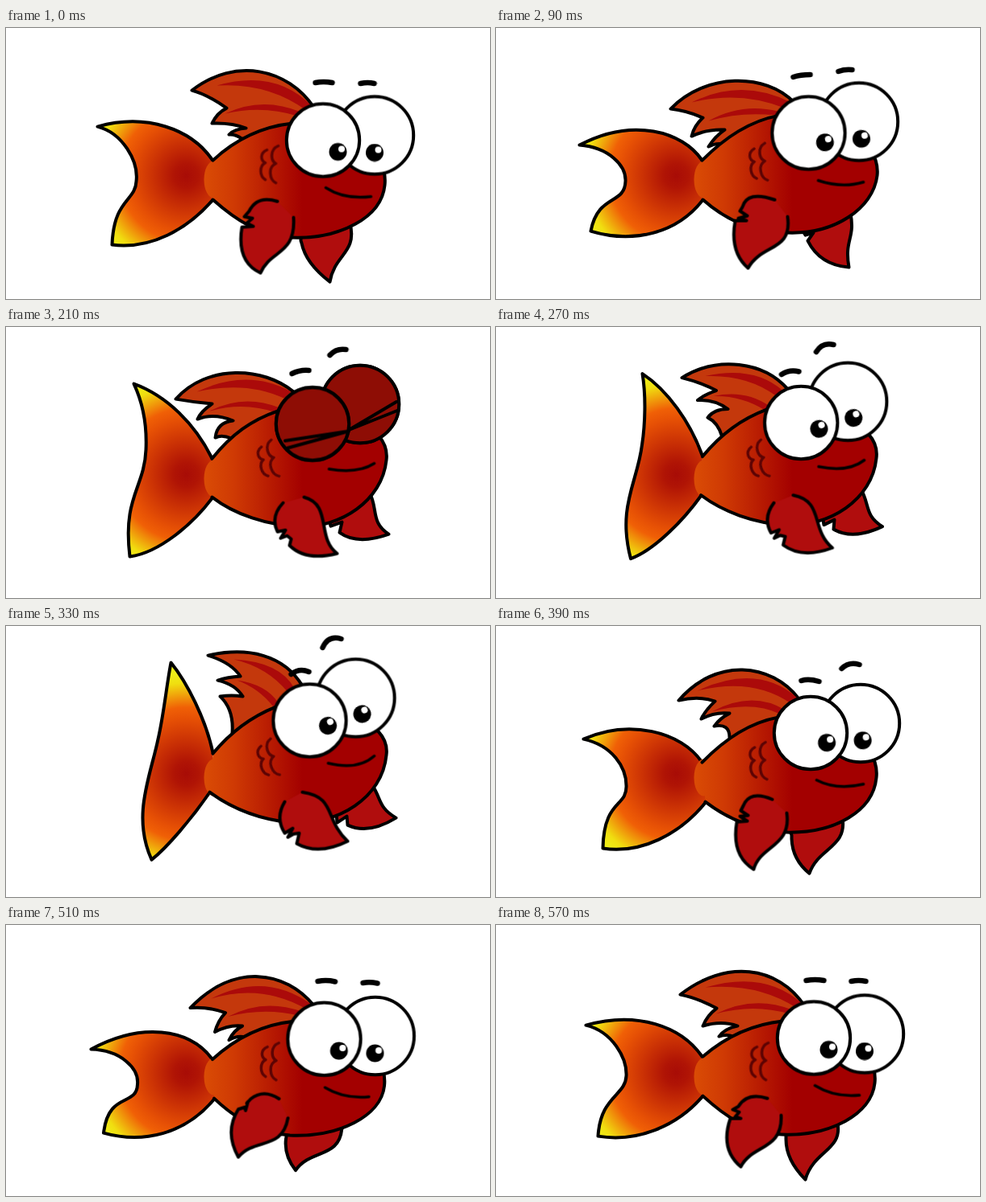
An HTML page for the animation above (600 ms loop, 600x337 px).

```html
<!DOCTYPE html>
<html lang="en">
<head>
<meta charset="utf-8">
<title>Swimming fish</title>
<style>
html, body { margin: 0; width: 100%; height: 100%; overflow: hidden; background: #fff; }
svg { display: block; width: 100vw; height: 100vh; }
path, circle { stroke: #000; stroke-width: 4; stroke-linejoin: round; stroke-linecap: round; }
.plain { stroke: none; }
.line { fill: none; }
.move { animation: 600ms linear -1ms infinite; }

/* The resting pose is the implicit first and last keyframe. */
.tail { fill: url(#tailFill); animation-name: tail;
  d: path("M256,163 C230,125 175,105 114,122 C145,130 165,165 162,190 C161,215 134,212 132,269 C180,275 225,250 257,213"); }
@keyframes tail {
  15% { d: path("M256,164 C232,128 170,110 104,145 C140,148 162,170 161,190 C160,220 127,205 118,252 C170,268 225,255 257,213"); }
  35% { d: path("M256,163 C235,120 200,85 159,70 C173,100 175,130 174,152 C172,200 145,210 154,285 C190,280 232,245 257,211"); }
  55% { d: path("M257,157 C248,115 225,70 205,45 C200,70 196,110 189,140 C180,185 156,235 181,290 C200,275 230,240 254,205"); }
  65% { d: path("M256,169 C230,130 165,115 109,140 C145,148 162,175 162,198 C163,225 134,215 133,276 C180,283 228,259 261,218"); }
  75% { d: path("M256,169 C225,130 160,135 100,184 C140,178 168,190 165,208 C164,240 125,200 116,254 C165,273 220,270 261,219"); }
  95% { d: path("M256,163 C230,125 175,106 112,124 C145,132 163,165 162,187 C161,212 130,212 127,262 C175,270 225,250 257,212"); }
}

.body { fill: url(#bodyFill); animation-name: body;
  d: path("M257,164 C285,138 318,122 356,118 C420,112 475,150 470,195 C466,235 415,262 355,260 C315,258 285,238 257,213"); }
@keyframes body {
  15% { d: path("M256,164 C285,135 315,115 352,108 C416,102 478,138 473,183 C468,224 420,256 362,254 C320,254 285,238 257,213"); }
  35% { d: path("M256,163 C280,133 305,115 337,104 C400,95 478,118 472,165 C467,215 415,250 365,247 C325,247 283,232 256,211"); }
  55% { d: path("M257,158 C280,130 305,112 335,100 C400,94 478,115 472,160 C467,213 412,247 355,244 C315,240 280,226 253,206"); }
  65% { d: path("M256,169 C285,139 318,119 350,113 C416,106 477,143 472,188 C468,230 420,257 362,256 C325,254 290,241 260,218"); }
  75% { d: path("M256,170 C285,142 318,124 355,120 C420,116 474,157 469,203 C465,240 410,265 350,262 C315,258 285,243 260,218"); }
  95% { d: path("M257,163 C285,139 318,123 356,119 C420,113 475,152 470,196 C466,235 415,262 355,260 C315,258 285,238 257,212"); }
}

.dorsal { fill: #c4380c; animation-name: dorsal;
  d: path("M382,98 C350,50 285,35 231,77 Q250,82 274,99 Q262,105 256,118 Q280,117 298,124 Q284,125 277,132 Q284,131 293,137 L350,140"); }
@keyframes dorsal {
  15% { d: path("M370,92 C335,55 260,55 217,100 Q236,102 257,111 Q246,121 243,134 Q262,125 284,126 Q272,134 264,147 Q273,142 283,144 L345,140"); }
  35% { d: path("M357,80 C320,49 250,45 211,89 Q234,93 256,95 Q242,104 238,114 Q258,106 282,116 Q262,118 260,137 Q268,133 280,138 L335,130"); }
  55% { d: path("M368,74 C345,35 300,25 251,36 Q280,45 291,62 Q275,63 263,67 Q285,72 294,87 Q280,85 266,87 Q283,103 281,132 L335,125"); }
  65% { d: path("M376,90 C342,45 273,38 227,92 Q252,86 272,93 Q260,104 255,115 Q272,106 290,108 Q278,114 271,124 Q290,120 290,138 L345,140"); }
  75% { d: path("M382,100 C345,62 280,50 229,119 Q250,111 271,114 Q264,125 262,140 Q274,128 287,125 Q281,133 277,147 Q288,138 300,140 L350,145"); }
  95% { d: path("M383,100 C350,50 285,42 229,86 Q250,90 274,103 Q262,112 257,125 Q280,118 300,125 Q284,128 277,138 Q286,135 295,138 L350,142"); }
}

.stripes { fill: #ab0a0a; animation-name: stripes;
  d: path("M262,71 Q335,50 380,97 L373,102 Q325,67 262,71 M272,106 Q318,84 366,104 L362,109 Q318,95 272,106"); }
@keyframes stripes {
  15% { d: path("M243,92 Q305,61 366,92 L358,99 Q303,77 243,92 M264,115 Q305,92 350,103 L347,108 Q305,103 264,115"); }
  35% { d: path("M237,80 Q300,50 354,80 L345,88 Q298,66 237,80 M253,104 Q295,82 340,100 L336,106 Q295,92 253,104"); }
  55% { d: path("M283,41 Q340,44 358,77 L350,82 Q325,51 283,41 M287,67 Q323,72 338,95 L332,100 Q314,77 287,67"); }
  65% { d: path("M250,80 Q325,45 374,89 L365,95 Q318,63 250,80 M268,106 Q318,79 359,104 L353,109 Q318,92 268,106"); }
  75% { d: path("M250,105 Q308,58 378,99 L370,104 Q308,73 250,105 M278,117 Q320,94 366,109 L362,114 Q320,106 278,117"); }
  95% { d: path("M260,77 Q335,55 381,98 L374,103 Q325,71 260,77 M273,110 Q320,86 368,105 L364,110 Q320,97 273,110"); }
}

.near { fill: #b00d0d; animation-name: near;
  d: path("M337,215 Q312,207 302,227 L296,234 L306,236 L299,242 L307,246 L293,247 Q286,290 316,304 C328,275 360,282 357,235"); }
@keyframes near {
  15% { d: path("M346,213 Q312,201 306,222 L303,227 L312,233 L301,236 L311,239 L297,239 Q290,278 313,298 C330,267 368,278 362,234"); }
  35% { d: path("M344,218 Q328,235 337,254 L347,252 L341,262 L349,259 L354,263 L352,271 Q372,291 411,281 C385,262 405,220 370,211"); }
  55% { d: path("M346,218 Q334,238 346,257 L356,251 L350,262 L357,258 L364,257 L361,270 Q388,285 424,267 C395,240 410,212 368,206"); }
  65% { d: path("M343,215 Q315,203 307,223 L304,229 L313,235 L303,236 L312,242 L299,243 Q292,285 320,302 C328,272 367,274 361,232"); }
  75% { d: path("M341,216 Q328,199 307,206 L304,213 L299,206 L298,222 L289,212 L286,217 Q264,235 273,276 C300,255 330,280 346,243"); }
  95% { d: path("M337,215 Q312,207 301,225 L294,229 L302,232 L297,238 L304,240 L291,240 Q278,278 304,300 C318,272 356,280 354,236"); }
}

.far { fill: #b00d0d; animation-name: far;
  d: path("M366,258 L366,261 L366,264 L367,267 Q372,292 402,315 C408,280 436,280 427,242"); }
@keyframes far {
  15% { d: path("M380,250 L384,257 L394,254 L387,264 Q402,294 438,297 C432,262 446,262 440,230"); }
  35% { d: path("M400,235 L403,247 L417,242 L414,255 Q436,271 475,257 C452,242 462,225 451,205"); }
  55% { d: path("M410,232 L411,244 L423,236 L424,247 Q450,259 484,238 C462,225 466,215 455,198"); }
  65% { d: path("M365,252 L366,256 L367,260 L367,264 Q368,290 389,307 C400,275 436,275 430,238"); }
  75% { d: path("M338,258 L337,260 L336,262 L335,265 Q330,280 335,293 C362,275 400,300 410,255"); }
  95% { d: path("M360,258 L360,260 L360,263 L360,266 Q360,292 384,316 C394,280 430,280 424,246"); }
}

.smile { stroke-width: 3.5; animation-name: smile; d: path("M397,198 Q420,213 453,209"); }
@keyframes smile {
  15% { d: path("M400,189 Q430,199 456,191"); }
  35% { d: path("M401,176 Q437,182 457,169"); }
  55% { d: path("M400,170 Q437,179 457,161"); }
  65% { d: path("M398,191 Q423,204 456,196"); }
  75% { d: path("M396,204 Q420,218 450,215"); }
  95% { d: path("M396,199 Q420,214 451,211"); }
}

.brows { stroke-width: 6.5; animation-name: brows;
  d: path("M384,68 Q394,66 405,68 M440,69 Q449,67 457,69"); }
@keyframes brows {
  15% { d: path("M369,61 Q378,58 390,58 M425,54 Q433,51 442,52"); }
  35% { d: path("M355,58 Q365,53 376,54 M402,35 Q410,26 422,28"); }
  55% { d: path("M354,60 Q364,52 376,57 M393,27 Q400,11 416,16"); }
  65% { d: path("M379,68 Q388,65 401,69 M429,53 Q438,44 451,48"); }
  75% { d: path("M389,71 Q400,69 410,72 M445,74 Q453,73 463,75"); }
  95% { d: path("M385,69 Q396,67 407,69 M441,70 Q450,68 459,70"); }
}

.scales path { fill: none; stroke: #5c0303; stroke-width: 3.5; }
.scales { transform-origin: 327px 169px; transform: translate(0, 0) rotate(0deg); animation-name: scales; }
@keyframes scales {
  15% { transform: translate(-1px, -2px) rotate(-8deg); }
  35% { transform: translate(-2px, -4px) rotate(-16deg); }
  55% { transform: translate(-2px, -4px) rotate(-18deg); }
  65% { transform: translate(-1px, -1px) rotate(-6deg); }
  75% { transform: translate(1px, 0) rotate(1deg); }
  95% { transform: translate(0, 0) rotate(0deg); }
}

.left { transform: translate(393.5px, 139.5px); animation-name: left; }
@keyframes left {
  15% { transform: translate(388px, 130.5px); }
  35% { transform: translate(380.5px, 120.5px); }
  55% { transform: translate(377px, 117.5px); }
  65% { transform: translate(390.5px, 133px); }
  75% { transform: translate(395.5px, 143px); }
  95% { transform: translate(394.5px, 140.5px); }
}
.right { transform: translate(457.5px, 133.5px); animation-name: right; }
@keyframes right {
  15% { transform: translate(450.5px, 116.5px); }
  35% { transform: translate(439.5px, 96px); }
  55% { transform: translate(434px, 89.5px); }
  65% { transform: translate(452.5px, 121px); }
  75% { transform: translate(459px, 140.5px); }
  95% { transform: translate(457.5px, 135.5px); }
}
.gaze { transform: rotate(0deg); animation-name: gaze; }
@keyframes gaze {
  15% { transform: rotate(-8deg); }
  35% { transform: rotate(-16deg); }
  55% { transform: rotate(-22deg); }
  65% { transform: rotate(-7deg); }
  75% { transform: rotate(1.5deg); }
  95% { transform: rotate(0deg); }
}
.lid { opacity: 0; animation-name: blink; }
.lid circle { fill: #8e0d05; }
@keyframes blink {
  28% { opacity: 0; }
  29%, 43% { opacity: 1; }
  44% { opacity: 0; }
}
</style>
</head>
<body>
<svg viewBox="0 0 600 337">
  <defs>
    <radialGradient id="tailFill" gradientUnits="userSpaceOnUse" cx="224" cy="183" r="125">
      <stop offset="0" stop-color="#a80c06"/>
      <stop offset=".12" stop-color="#b01405"/>
      <stop offset=".55" stop-color="#e65005"/>
      <stop offset=".66" stop-color="#f06006"/>
      <stop offset=".9" stop-color="#f0de10"/>
      <stop offset="1" stop-color="#eeee18"/>
    </radialGradient>
    <linearGradient id="bodyFill" gradientUnits="userSpaceOnUse" x1="246" y1="0" x2="368" y2="0">
      <stop offset="0" stop-color="#da4c05"/>
      <stop offset=".3" stop-color="#cf3a04"/>
      <stop offset="1" stop-color="#a30000"/>
    </linearGradient>
  </defs>

  <g transform="translate(-.5 .6)">
    <path class="move tail"/>
    <path class="move dorsal"/>
    <path class="move stripes plain"/>
    <path class="move far"/>
    <ellipse cx="258" cy="188" rx="12" ry="23" fill="url(#bodyFill)"/>
    <path class="move body"/>
    <g class="move scales">
      <path d="M324,151 C315,155 316,164 322,167 C314,171 315,184 322,188"/>
      <path d="M338,146 C328,150 328,164 335,168 C325,172 327,188 335,192"/>
    </g>
    <path class="move smile line"/>
    <path class="move near"/>
  </g>

  <g transform="translate(-.5 0)">
    <g class="move right">
      <circle r="48.2" fill="#fff"/>
      <g class="move gaze">
        <circle class="plain" cx="0" cy="21.5" r="11"/>
        <circle class="plain" cx="4.5" cy="18" r="4" fill="#fff"/>
      </g>
      <g class="move lid">
        <circle r="48.2"/>
        <path class="line" d="M45,-3 L-14,32 L46,8"/>
      </g>
    </g>
    <g class="move left">
      <circle r="45.2" fill="#fff"/>
      <g class="move gaze">
        <circle class="plain" cx="18.5" cy="14.5" r="11"/>
        <circle class="plain" cx="23" cy="11" r="4" fill="#fff"/>
      </g>
      <g class="move lid">
        <circle r="45.2"/>
        <path class="line" d="M-34,21 L45,9 L-31,30"/>
      </g>
    </g>
    <path class="move brows line"/>
  </g>
</svg>
<script>
// Twenty held drawings per loop.
for (const a of document.getAnimations()) a.effect.updateTiming({ easing: "steps(20)" });
</script>
</body>
</html>
```
